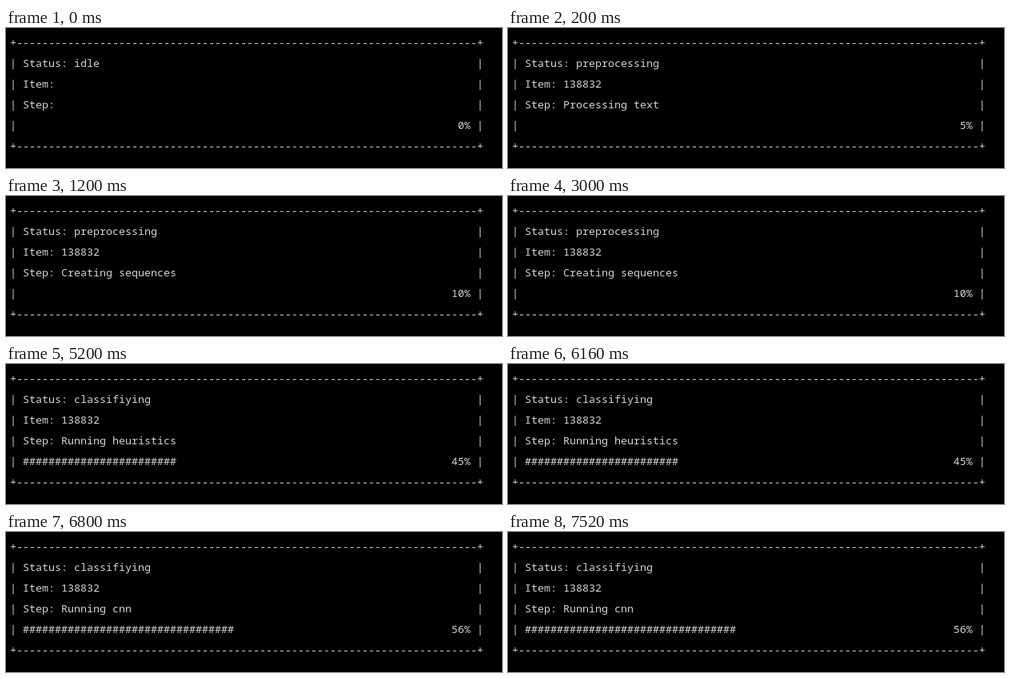
These frames come from a looping animation (620x176 px, 8 s). An HTML page:

```html
<!DOCTYPE html>
<html lang="en">
<head>
<meta charset="utf-8">
<title>Progress box</title>
<style>
  html, body { margin: 0; width: 100%; height: 100%; overflow: hidden; background: #000; }
  pre {
    margin: 0;
    padding: 5px 0 0 5px;
    color: #d4d4d4;
    font: 500 13.3333px/26px "Noto Sans Mono", "DejaVu Sans Mono", monospace;
    font-variant-ligatures: none;
  }
</style>
</head>
<body>
<pre id="box"></pre>
<script>
const LOOP = 8000;
const WIDTH = 70; // characters between the inner margins
const ITEM = "138832";

// start (ms), status, item, step, bar length, percent
const states = [
  [0, "idle", "", "", 0, 0],
  [200, "preprocessing", ITEM, "Processing text", 0, 5],
  [1200, "preprocessing", ITEM, "Creating sequences", 0, 10],
  [4200, "preprocessing", ITEM, "Extracting entities", 13, 30],
  [5200, "classifiying", ITEM, "Running heuristics", 24, 45],
  [6800, "classifiying", ITEM, "Running cnn", 33, 56],
];

const box = document.getElementById("box");
const edge = "+" + "-".repeat(WIDTH + 2) + "+";
const row = text => `| ${text.padEnd(WIDTH)} |`;

function render([, status, item, step, bar, percent]) {
  const label = percent + "%";
  return [
    edge,
    row("Status: " + status),
    row("Item: " + item),
    row("Step: " + step),
    row("#".repeat(bar).padEnd(WIDTH - label.length) + label),
    edge,
  ].join("\n");
}

let shown;
function tick() {
  const time = performance.now() % LOOP;
  const state = states.findLast(([start]) => start <= time);
  if (state !== shown) {
    box.textContent = render(state);
    shown = state;
  }
  requestAnimationFrame(tick);
}
tick();
</script>
</body>
</html>
```
